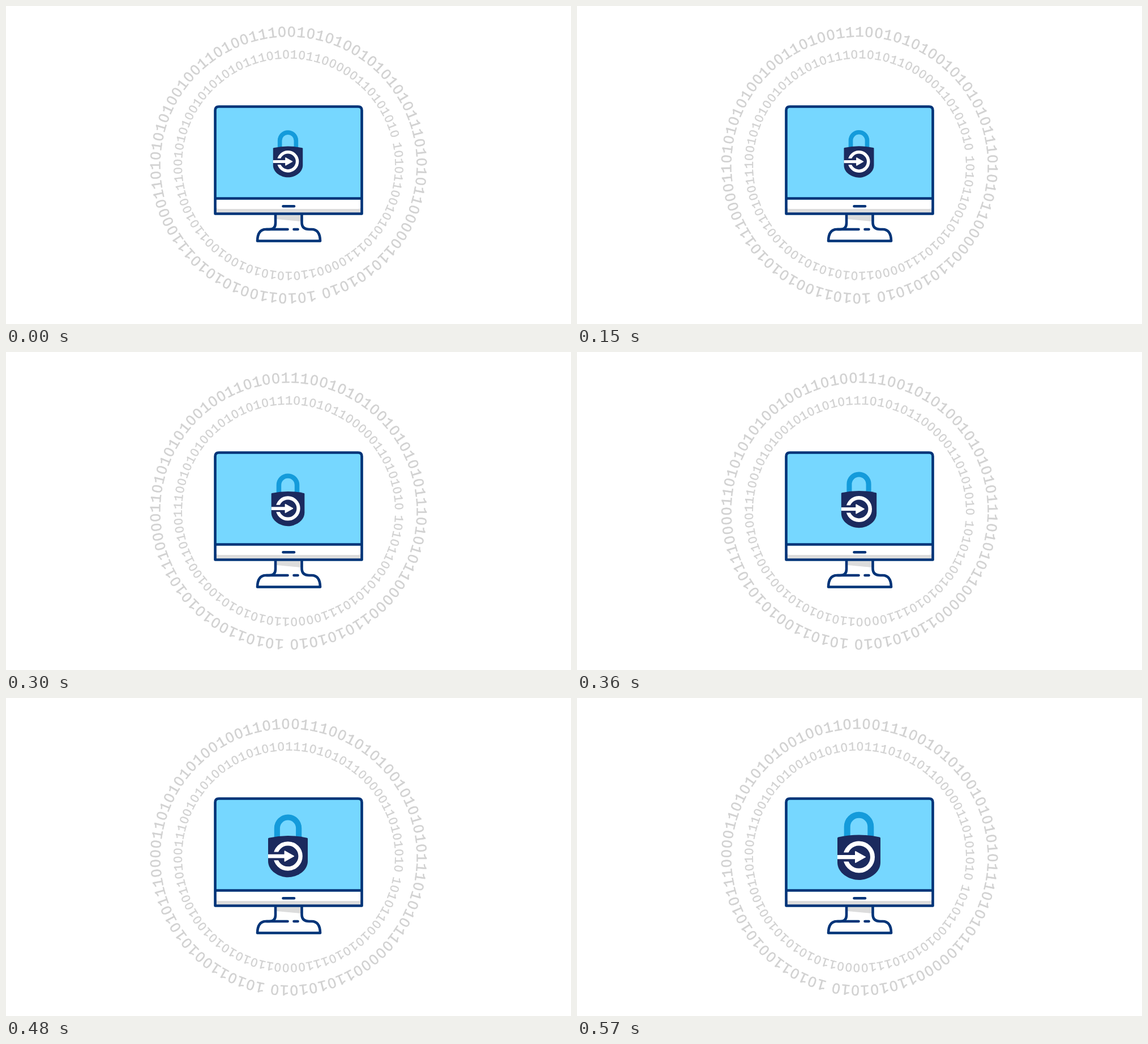
An HTML page for the animation above (600 ms loop, 998 by 561 pixels).

```html
<!DOCTYPE html>
<html lang="en">
<head>
<meta charset="utf-8">
<title>Secure computer</title>
<style>
  html, body { margin: 0; width: 100%; height: 100%; overflow: hidden; background: #fff; }
  svg { display: block; width: 998px; height: 561px; }
  .digits { fill: #d1d1d1; stroke: #d1d1d1; stroke-width: .5; text-anchor: middle; }
  .one { font: 26.7px "Liberation Mono", monospace; }
  .zero { font: 25.6px "Liberation Sans", sans-serif; }
  .line { stroke: #003478; stroke-width: 4.6; stroke-linecap: round; stroke-linejoin: round; fill: none; }
</style>
</head>
<body>
<svg viewBox="0 0 998 561">
  <g class="digits" id="outer"></g>
  <g class="digits" id="inner"></g>

  <g id="monitor">
    <path fill="#dcdcdc" d="M478 368H521V380L478 376Z"/>
    <path class="line" d="M476 368V383Q476 394 465 394H459Q444.500 394 444 414.500H555Q554.500 394 540 394H536Q522.500 394 522.500 382V368"/>
    <path class="line" d="M460 394H497.500M508.500 394H515.500"/>
    <path fill="#76d7ff" d="M369.500 339.500V184Q369.500 177.500 376 177.500H622Q628.500 177.500 628.500 184V339.500Z"/>
    <path fill="#dcdcdc" d="M370 340H628V366H370Z"/>
    <path fill="#fff" d="M371 340H627V353Q627 358 622 358H376Q371 358 371 353Z"/>
    <path class="line" d="M369.500 366.500V184Q369.500 177.500 376 177.500H622Q628.500 177.500 628.500 184V366.500ZM369.500 339.500H628.500M489.500 353.200H509"/>
  </g>

  <g id="lock">
    <path fill="none" stroke="#149bdb" stroke-width="11" d="M477.200 246V227A20.800 20.800 0 0 1 518.800 227V246"/>
    <path fill="#1b2a5e" d="M460 247Q460 246 461.500 245.500Q498 237.500 534.500 245.500Q536 246 536 247V290C536 309 515 321 498 321C481 321 460 309 460 290Z"/>
    <circle cx="498" cy="280.500" r="24" fill="none" stroke="#fff" stroke-width="8"/>
    <path fill="#1b2a5e" d="M462 272.500H482V288.500H462Z"/>
    <path fill="#fff" d="M460 277H493V284.300H460Z"/>
    <path fill="#fff" stroke="#fff" stroke-width="2" stroke-linejoin="round" d="M492 271L509 280.500L492 290Z"/>
  </g>
</svg>
<script>
  const LOOP = 600, STEP = 30;
  const BITS = "1010110010" + "1010111000" + "0110101010" + "1001001101" + "0011100101" +
               "0100101010" + "1011101010" + "1100000110" + "101010";
  const PITCH = 4.159;      // degrees between digits
  const SPEED = 28 / LOOP;  // degrees per ms
  const RADIUS = 235.3;
  const SIZES = [[0, .69], [50, .671], [90, .672], [210, .722], [300, .772],
                 [420, .871], [480, .921], [570, 1], [600, 1.026]];

  const byId = id => document.getElementById(id);

  function makeRing(id, start, scale) {
    const group = byId(id);
    [...BITS].forEach((bit, i) => {
      const digit = document.createElementNS("http://www.w3.org/2000/svg", "text");
      digit.textContent = bit;
      digit.setAttribute("class", bit === "1" ? "one" : "zero");
      digit.setAttribute("transform", `rotate(${i * PITCH}) translate(0 ${8.8 - RADIUS})`);
      group.append(digit);
    });
    return turn => group.setAttribute("transform",
      `translate(499 280.7) rotate(${start + turn}) scale(${scale})`);
  }

  function sizeAt(t) {
    const i = SIZES.findIndex(([time]) => time > t);
    const [t0, s0] = SIZES[i - 1], [t1, s1] = SIZES[i];
    return s0 + (s1 - s0) * (t - t0) / (t1 - t0);
  }

  const rings = [makeRing("outer", 170, 1), makeRing("inner", 80, .831)];
  const lock = byId("lock");

  function draw(now) {
    const t = Math.floor(now % LOOP / STEP) * STEP;
    rings.forEach(spin => spin(t * SPEED));
    lock.setAttribute("transform",
      `translate(498 260.700) scale(${sizeAt(t)}) translate(-498 -260.700)`);
  }

  const begin = performance.now();
  function tick() {
    draw(performance.now() - begin);
    requestAnimationFrame(tick);
  }
  tick();
</script>
</body>
</html>
```
